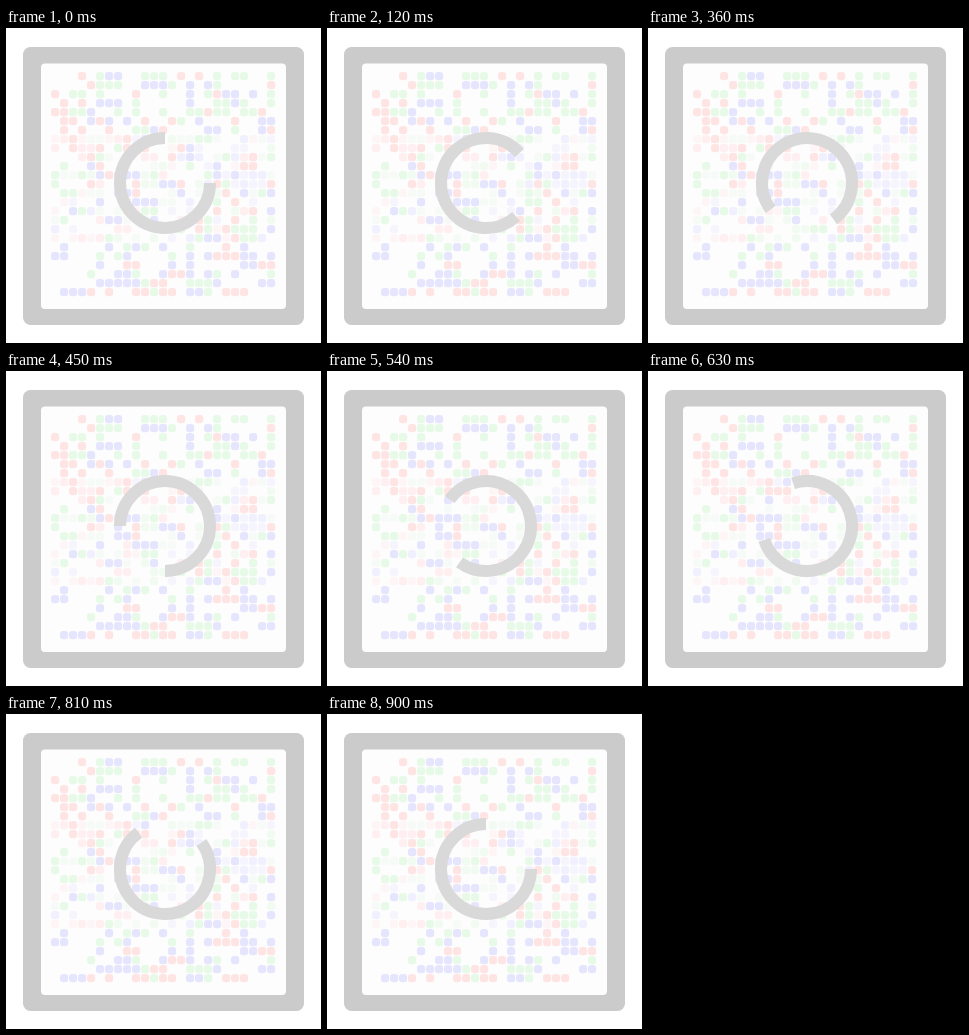
Write an HTML page that moves like this. It is 315 px wide and 315 px high and loops after 0.93 s.

```html
<!DOCTYPE html>
<html lang="en">
<head>
<meta charset="utf-8">
<title>Loading</title>
<style>
  html, body { margin: 0; width: 100%; height: 100%; overflow: hidden; background: #fff; }
  svg { display: block; width: 100vw; height: 100vh; }
</style>
</head>
<body>
<svg viewBox="0 0 315 315">
  <rect x="17" y="19" width="281" height="278" rx="7.5" fill="#cbcbcb"/>
  <rect x="35" y="35.5" width="245" height="245.5" rx="4" fill="#fefdfe"/>
  <g id="dots"></g>
  <path id="spinner" d="M204 155A45 45 0 1 1 159 110" fill="none" stroke="#d9d9d9" stroke-width="12"/>
</svg>
<script>
const SIZE = 25, PITCH = 9;
const STEP_MS = 30, STEP_DEG = 12, LOOP_MS = 930;
const COLORS = ['#ffe4e4', '#e7fae7', '#e5e5fd'];
const dots = document.getElementById('dots');
const spinner = document.getElementById('spinner');

let seed = 29;
function random() {
  seed = (seed * 16807) % 2147483647;
  return seed / 2147483647;
}

function addDot(col, row, color, opacity) {
  const dot = document.createElementNS('http://www.w3.org/2000/svg', 'rect');
  const attrs = {
    x: 45 + col * PITCH, y: 44 + row * PITCH,
    width: 8.2, height: 8.2, rx: 3.2, fill: color, opacity
  };
  for (const name in attrs) dot.setAttribute(name, attrs[name]);
  dots.append(dot);
}

// Faint confetti: short colour runs, sparse left corners, paler middle rows.
for (let row = 0; row < SIZE; row++) {
  let color = COLORS[0];
  const pale = row > 6 && row < 19;
  for (let col = 0; col < SIZE; col++) {
    if (random() < 0.6) color = COLORS[Math.floor(random() * 3)];
    const corner = col < 4 && (row < 3 || row > 19);
    const filled = random() < (corner ? 0.2 : 0.52);
    if (filled) addDot(col, row, color, pale && random() < 0.3 ? 0.55 : 1);
    else if (pale && random() < 0.4) addDot(col, row, color, 0.3);
  }
}

function draw() {
  const step = Math.floor((performance.now() % LOOP_MS) / STEP_MS);
  spinner.setAttribute('transform', `rotate(${step * STEP_DEG} 159 155)`);
  requestAnimationFrame(draw);
}
draw();
</script>
</body>
</html>
```
